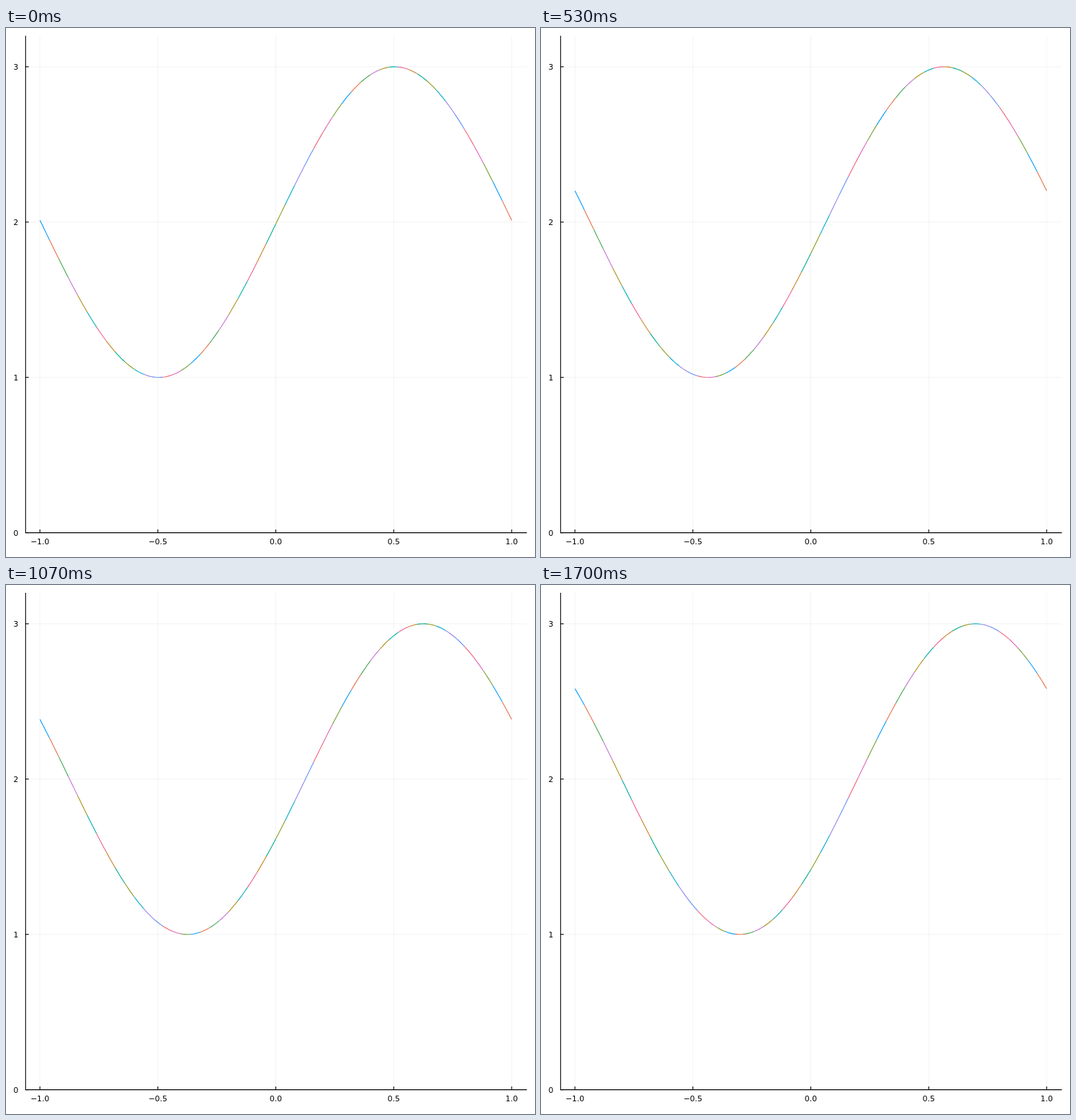
Animation of 748x749 px, one loop 1730 ms. Source, as an HTML page:

```html
<!DOCTYPE html>
<html lang="en">
<head>
<meta charset="utf-8">
<title>Travelling sine wave</title>
<style>
  html, body { margin: 0; width: 100%; height: 100%; overflow: hidden; background: #fff; }
  svg { display: block; }
  path { fill: none; }
  text { font: 11px "DejaVu Sans", sans-serif; fill: #000; }
  .grid { stroke: #000; stroke-opacity: .1; stroke-width: .5; }
  .axis { stroke: #000; stroke-width: 1.1; }
  .wave { stroke-width: 1.1; }
</style>
</head>
<body>
<svg id="plot" width="748" height="749" viewBox="0 0 748 749"></svg>
<script>
const LOOP = 1730;
const CELLS = 50;
const SUBSTEPS = 4;
const PHASE_STEP = 0.01196;
const LEFT = 27.7, RIGHT = 736.5, TOP = 11, BOTTOM = 714.6, TICK = 4.5;
const COLORS = [
  "#009afa", "#e36f47", "#3ea44e", "#c371d2", "#ac8e18", "#00aaae", "#ed5e93", "#c68225",
  "#00a98d", "#8e971e", "#00a9cc", "#9b7fe9", "#618df6", "#f06073", "#dd65b6", "#6c9f33"
];

const plot = document.getElementById("plot");
const px = x => 381.5 + 333.5 * x;
const py = y => BOTTOM - 219.9 * y;

function add(tag, attrs, text = "") {
  const el = document.createElementNS("http://www.w3.org/2000/svg", tag);
  for (const name in attrs) el.setAttribute(name, attrs[name]);
  el.textContent = text;
  return plot.appendChild(el);
}

const line = (cls, d) => add("path", { class: cls, d });

for (const x of [-1, -0.5, 0, 0.5, 1]) {
  const X = px(x);
  line("grid", `M${X} ${TOP}V${BOTTOM}`);
  line("axis", `M${X} ${BOTTOM}v${-TICK}`);
  add("text", { x: X, y: 731, "text-anchor": "middle" }, x.toFixed(1).replace("-", "\u2212"));
}
for (const y of [0, 1, 2, 3]) {
  const Y = py(y);
  line("grid", `M${LEFT} ${Y}H${RIGHT}`);
  line("axis", `M${LEFT} ${Y}h${TICK}`);
  add("text", { x: 17.5, y: Y + 4.2, "text-anchor": "end" }, y);
}
line("axis", `M${LEFT} ${TOP}V${BOTTOM}H${RIGHT}`);

const cells = Array.from({ length: CELLS }, (_, i) =>
  add("path", { class: "wave", stroke: COLORS[i % COLORS.length] }));

function drawWave(phase) {
  cells.forEach((cell, i) => {
    const points = [];
    for (let j = 0; j <= SUBSTEPS; j++) {
      const x = -1 + 2 * (i + j / SUBSTEPS) / CELLS;
      const y = 2 + Math.sin(Math.PI * x - phase);
      points.push(px(x).toFixed(2) + " " + py(y).toFixed(2));
    }
    cell.setAttribute("d", "M" + points.join("L"));
  });
}

// 30 steps per second, with step times rounded to 10 ms
function stepAt(time) {
  const t = Math.floor(time % LOOP / 10) * 10;
  return Math.floor((t + 5) * 0.03);
}

let shown = -1;
function tick() {
  const step = stepAt(performance.now());
  if (step !== shown) {
    shown = step;
    drawWave((step + 1) * PHASE_STEP);
  }
  requestAnimationFrame(tick);
}
tick();
</script>
</body>
</html>
```
